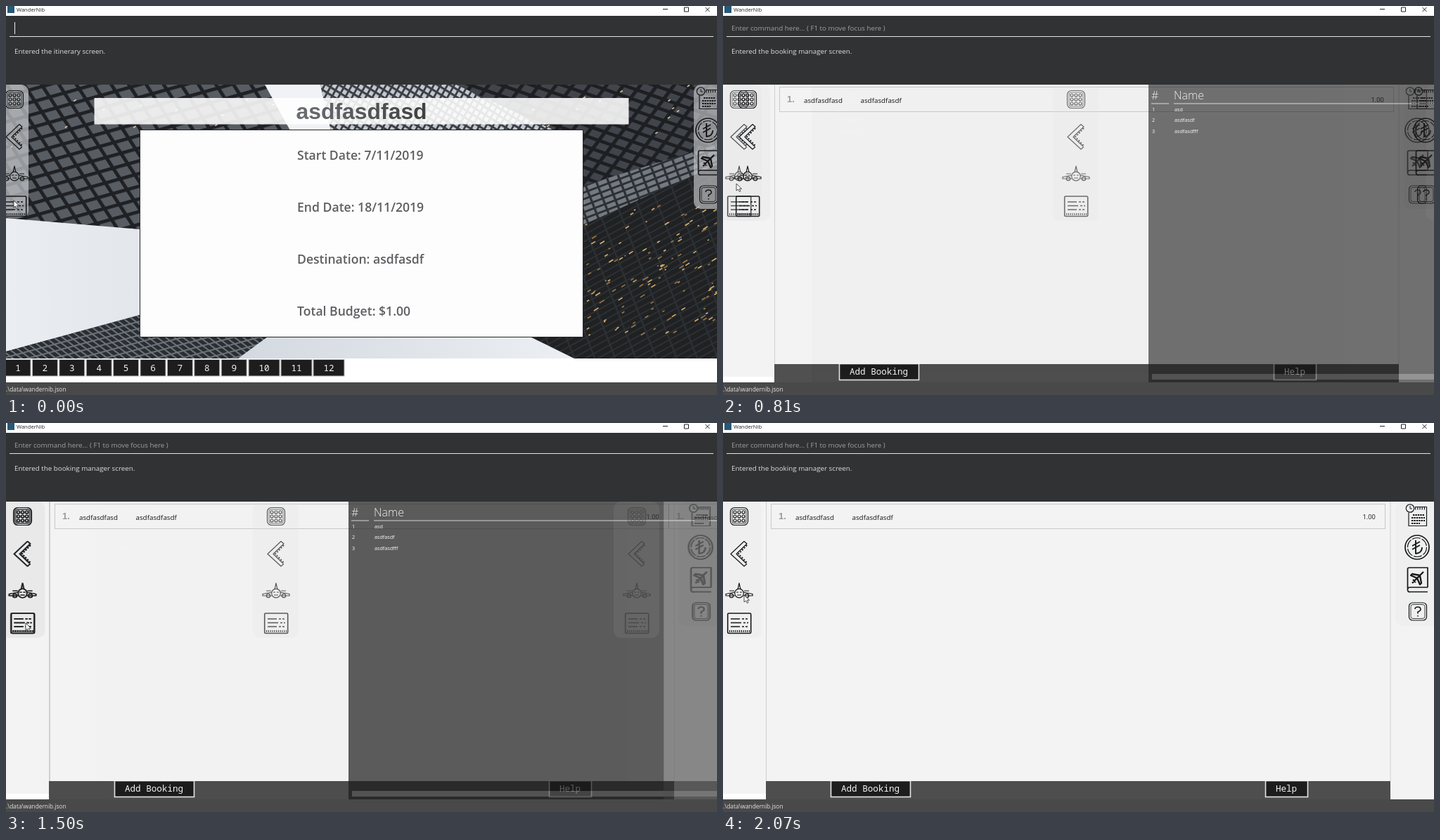
Recreate the animation shown at these times as an HTML page. Size 1011x554 px, loop 2300 ms.

```html
<!DOCTYPE html>
<html lang="en">
<head>
<meta charset="utf-8">
<title>WanderNib</title>
<style>
html, body { margin: 0; width: 100%; height: 100%; overflow: hidden; background: #fff; }
svg { display: block; width: 100%; height: 100%; }
text { font-family: "Open Sans", "Noto Sans", sans-serif; white-space: pre; }
.mono { font-family: "Noto Sans Mono", "DejaVu Sans Mono", monospace; }
.arial { font-family: "Liberation Sans", Arial, sans-serif; font-weight: 700; }
.light { font-weight: 300; }
.semi { font-weight: 600; }
.icon { fill: none; stroke: #17181a; stroke-width: 1.2; stroke-linejoin: round; }
</style>
</head>
<body>
<svg id="stage" viewBox="0 0 1011 554" preserveAspectRatio="none"></svg>
<script>
const LOOP = 2300, STEP = 30, WIDTH = 1011, SLIDE = 384;
const stage = document.getElementById('stage');

const rect = (x, y, w, h, fill, extra = '') =>
  `<rect x="${x}" y="${y}" width="${w}" height="${h}" fill="${fill}" ${extra}/>`;
const poly = (points, fill) => `<polygon points="${points}" fill="${fill}"/>`;
const path = (d, extra = '') => `<path d="${d}" ${extra}/>`;
const circle = (x, y, r, extra = '') => `<circle cx="${x}" cy="${y}" r="${r}" ${extra}/>`;
const text = (x, y, size, fill, str, cls = '', extra = '') =>
  `<text x="${x}" y="${y}" font-size="${size}" fill="${fill}" class="${cls}" ${extra}>${str}</text>`;
const range = n => [...Array(n).keys()];

function randomFrom(seed) {
  return () => (seed = (seed * 16807) % 2147483647) / 2147483647;
}

// Side bars
function leftIcons() {
  const dots = range(9).map(i => circle(17 + i % 3 * 6, 127 + Math.floor(i / 3) * 6, 2)).join('');
  return `<g class="icon">
    ${rect(10.5, 120.5, 25, 25, 'none', 'rx="6"')}${rect(13, 123, 20, 20, 'none', 'rx="3" stroke-width=".8"')}${dots}
    ${path('M30 168.5L11 186.5L30 204L34 200.5M30 168.5L34 172L19 186.5L33 200')}
    ${path('M34 174L22 186.5L34 199', 'stroke-width="2" stroke-dasharray="2 2"')}
    ${path('M21 237L23 228L25 237M17 241L4 243.5V246L17 246M29 241L42 243.5V246L29 246')}
    ${circle(23, 242.5, 6.3)}${circle(12, 246, 2.7)}${circle(34, 246, 2.7)}
    ${path('M19 241H22M24 241H27M20 245H26M9 239H16M30 239H37', 'stroke-width="1"')}
    ${rect(6.7, 271, 33, 28.5, 'none', 'rx="1.5" stroke-width="1.6"')}
    ${path('M11 279H24M11 284.5H26M11 290H24', 'stroke-width="1.6"')}
    ${path('M27 279H36M29 284.5H36M27 290H36', 'stroke-width="1.6" stroke-dasharray="3 2"')}
    ${path('M9 296.5H38', 'stroke-width="3" stroke-dasharray="1.2 1.6"')}
  </g>`;
}

function rightIcons() {
  return `<g class="icon">
    ${circle(977, 121.5, 5.7)}${path('M977 118V122H980', 'stroke-width="1"')}
    ${path('M975 128V146.5H1000.5V119.5H984')}
    ${path('M984 121.5H999', 'stroke-width="4" stroke-dasharray="1.2 2"')}
    ${path('M981 131H998M979 135H998M979 139H998M979 143H991', 'stroke-width="2.2" stroke-dasharray="2.4 1"')}
    ${circle(987, 177, 17, 'stroke-width="1.7"')}${circle(987, 177, 13.5, 'stroke-dasharray="12 2"')}
    ${path('M985 167V186Q994 185 994 177M980 175L991 169M980 180L991 174', 'stroke-width="1.9"')}
    ${path('M1002 234H977Q973.5 234 973.5 237.5T977 240.5H1002M973.5 237V208Q973.5 206 976 206H1002V234', 'stroke-width="1.7"')}
    ${path('M980 228L996 212M991 217L980 215L978 217L987 221M991 217L993 228L991 230L987 221M981 223L985 227', 'stroke-width="2.3"')}
    ${rect(975.5, 256, 25, 25, 'none', 'rx="5"')}${rect(978, 258.5, 20, 20, 'none', 'rx="3" stroke-width=".8"')}
    ${path('M984 265Q984 262 988 262T992 265.5Q992 267.5 988 269V271.5M988 274V275.5', 'stroke-width="1.6"')}
  </g>`;
}

const sideBars = () =>
  rect(-10, 112, 65, 194, '#e3e3e3', 'rx="10" opacity=".29"') +
  rect(956, 112, 65, 177, '#e3e3e3', 'rx="10" opacity=".29"') + leftIcons() + rightIcons();

// Pages
function skyline() {
  const random = randomFrom(77);
  const lamp = (x, y, w, tone) => rect(x.toFixed(1), y.toFixed(1), w.toFixed(1), 1.6, tone,
    `transform="rotate(-32 ${x.toFixed(1)} ${y.toFixed(1)})"`);
  const lamps = range(130).map(() => lamp(822 + random() * 189, 285 + random() * 185,
    2 + random() * 6, random() > .5 ? '#d9b26b' : '#9b7b4a')).join('');
  const highLamps = range(40).map(() => lamp(random() * WIDTH, 113 + random() * 90, 4, '#d8c8a8')).join('');
  return rect(0, 112, WIDTH, 390, '#25272b') +
    poly('0,112 372,112 430,177 190,320 0,302', 'url(#leftTower)') +
    poly('640,112 1011,112 1011,200 820,262 780,177', 'url(#rightTower)') +
    poly('820,262 1011,195 1011,502 760,502 745,471 820,440', 'url(#shade)') +
    highLamps + lamps +
    poly('368,112 447,112 462,177 404,177', '#f0f2f5') +
    poly('447,112 640,112 780,177 462,177', 'url(#mesh)') +
    poly('820,256 1011,197 1011,226 820,312', 'url(#steel)') +
    poly('0,302 190,318 190,440 0,492', 'url(#sky)') +
    poly('0,492 190,440 376,471 400,502 0,502', 'url(#ribs)') +
    poly('330,502 372,471 745,471 808,502', 'url(#haze)');
}

function itineraryPage() {
  const facts = ['Start Date: 7/11/2019', 'End Date: 18/11/2019', 'Destination: asdfasdf', 'Total Budget: $1.00'];
  const days = range(12).map(i => {
    const x = i < 9 ? -1 + i * 38.4 : 345 + (i - 9) * 46, w = i < 9 ? 36 : 44;
    return rect(x, 503.5, w, 23.5, '#1d1d1d', 'stroke="#b4b4b4"') +
      text(x + w / 2, 520, 12.7, '#f4f4f4', i + 1, 'mono', 'text-anchor="middle"');
  }).join('');
  return skyline() +
    rect(-12, 112, 44, 189, '#c4c6c9', 'rx="10" opacity=".72"') +
    rect(978, 112, 50, 177, '#c4c6c9', 'rx="10" opacity=".68"') +
    `<g transform="translate(-11)">${leftIcons()}</g><g transform="translate(11)">${rightIcons()}</g>` +
    rect(125.5, 131, 760, 37.5, '#fff', 'opacity=".88"') +
    text(412.5, 160.5, 31.9, 'url(#ink)', 'asdfasdfasd', 'arial') +
    rect(190.5, 176.5, 630, 295, '#fdfdfd', 'stroke="#25272a"') +
    facts.map((fact, i) => text(414, 219 + i * 74, 17.6, '#5e5f62', fact, 'semi')).join('') +
    rect(0, 502, WIDTH, 34, '#fff') + days;
}

function inventoryPage() {
  const rows = ['asd', 'asdfasdf', 'asdfasdfff'];
  return rect(126, 112, 759, 424, '#1c1c1c') +
    text(130, 133, 16, '#f2f2f2', '#', 'light') + text(162, 133, 16, '#f2f2f2', 'Name', 'light') +
    text(853, 133, 15, '#f2f2f2', '✓') +
    rect(130, 138.5, 25, 1, '#c8c8c8') + rect(162, 138.5, 684, 1, '#c8c8c8') +
    rows.map((row, i) => text(131, 149.7 + i * 15.4, 7.2, '#fff', i + 1) +
      text(163, 149.7 + i * 15.4, 7.2, '#fff', row)).join('') +
    rect(131, 524, 749, 8, '#565656') + sideBars();
}

function bookingPage() {
  const button = (x, w, label) => rect(x + .5, 509.5, w, 23, '#1d1d1d', 'stroke="#e6e6e6" stroke-width="1.6"') +
    rect(x - 1, 508, w + 3, 2, '#f3f3f3') +
    text(x + w / 2, 525, 12.6, '#f4f4f4', label, 'mono', 'text-anchor="middle"');
  return rect(61, 112, 888, 398, '#f3f3f3') + rect(61, 112, 1, 398, '#cfcfcf') + rect(948.5, 112, 1, 398, '#d2d2d2') +
    rect(68.5, 115.5, 873, 35, 'none', 'stroke="#c9c9c9"') +
    text(79, 136.5, 13, '#9a9a9a', '1.', 'arial') +
    text(103, 137.5, 9.8, '#161616', 'asdfasdfasd') + text(183.5, 138, 9.8, '#161616', 'asdfasdfasdf') +
    text(909.5, 136.5, 9.2, '#161616', '1.00') +
    rect(61, 510, 888, 26, '#4e4e4e') +
    button(153, 113, 'Add Booking') + button(771, 60, 'Help') + sideBars();
}

// Window panes in a leaning grid: the matrix holds the row and the column direction
const panes = (id, w, h, frame, glass, gap, matrix) =>
  `<pattern id="${id}" width="${w}" height="${h}" patternUnits="userSpaceOnUse" patternTransform="matrix(${matrix} 0 0)">
    ${rect(0, 0, w, h, frame)}${rect(gap, gap, w - gap, h - gap, glass)}</pattern>`;
const gradient = (id, from, to) =>
  `<linearGradient id="${id}"><stop stop-color="${from}"/><stop offset="1" stop-color="${to}"/></linearGradient>`;

const slides = [
  ['inventory', 340], ['booking', 450], ['inventory', 610], ['booking', 803], ['inventory', 960],
  ['booking', 1123], ['inventory', 1264], ['booking', 1420], ['inventory', 1565], ['booking', 1712, 358]
].map(([page, start, span = SLIDE]) => ({ page, start, span }));

const messages = {
  itinerary: 'Entered the itinerary screen.',
  inventory: 'entering the inventory page IS A SUCCESS',
  booking: 'Entered the booking manager screen.'
};

stage.innerHTML = `<defs>
  ${panes('leftTower', 21, 18, '#1f2124', '#585d64', 5, '1 -.28 .55 .85')}
  ${panes('rightTower', 19, 15, '#1d1f22', '#41454b', 5, '1 .35 -.6 .8')}
  ${panes('shade', 24, 9, '#2d3034', '#1f2123', 2, '1 -.55 .35 .9')}
  ${panes('ribs', 9, 12, '#6d747c', '#2a2d31', 2.5, '1 -.27 .8 .6')}
  ${panes('mesh', 9, 9, '#3b3f45', '#c3c8cf', 3, '.8 .5 -.5 .9')}
  ${panes('steel', 15, 9, '#2c2f33', '#747a82', 3, '1 -.38 .35 .9')}
  ${gradient('sky', '#eaedf1', '#e3e7ec')}${gradient('haze', '#d3d9e0', '#eceff3')}${gradient('ink', '#6b6f74', '#3f413f')}
  <clipPath id="view">${rect(0, 112, WIDTH, 424, '#fff')}</clipPath>
  <g id="itinerary">${itineraryPage()}</g><g id="inventory">${inventoryPage()}</g><g id="booking">${bookingPage()}</g>
</defs>
${rect(0, 0, WIDTH, 554, '#f3f3f3')}${rect(0, 528, 130, 8, '#fff')}
<g clip-path="url(#view)"><use id="first" href="#itinerary"/>
  ${slides.map(s => `<use class="slide" href="#${s.page}"/>`).join('')}</g>
${rect(0, 0, WIDTH, 14, '#fff')}${rect(2, 0, 10, 10, '#285878')}
${text(15, 8, 7.6, '#222', 'WanderNib')}
${path('M934 4.5H941M964.5 2H970.5V8H964.5ZM994.5 2L1000.5 8M1000.5 2L994.5 8', 'fill="none" stroke="#222"')}
${rect(0, 14, WIDTH, 98, '#313233')}${rect(5, 43, 1001, 1, '#e4e4e4')}
${rect(12, 23, 1, 17, '#eee', 'id="caret"')}
${text(12, 35, 9.8, '#a0a0a0', 'Enter command here... ( F1 to move focus here )', '', 'id="prompt"')}
${text(12, 68, 9.8, '#dedede', '', '', 'id="message"')}
${rect(0, 536, WIDTH, 18, '#49494a')}${text(0, 549, 8.3, '#e4e4e4', '.\\data\\wandernib.json')}
${circle(0, 0, 8, 'id="click" fill="#f2e600" opacity=".75"')}
${path('M0 0V10L2.5 8L4.3 11.5L6 10.7L4.3 7.3H7.5Z', 'id="pointer" fill="#fff" stroke="#222" stroke-width=".8"')}`;

const find = id => document.getElementById(id);
const [first, caret, hint, message, click, pointer] =
  ['first', 'caret', 'prompt', 'message', 'click', 'pointer'].map(find);
const slideNodes = [...document.querySelectorAll('.slide')];
const show = (node, visible) => { node.style.display = visible ? '' : 'none'; };

// time, x, y of the mouse pointer
const route = [
  [0, 11, 277], [200, 11, 277], [340, 13, 280], [420, 15, 244], [450, 15, 244], [610, 17, 284],
  [750, 18, 246], [810, 19, 253], [960, 22, 283], [1090, 24, 242], [1123, 25, 242], [1264, 26, 284],
  [1400, 27, 245], [1430, 27, 245], [1500, 28, 285], [1565, 28, 285], [1690, 29, 244], [2070, 30, 245]
];

function pointerAt(t) {
  const next = route.findIndex(key => key[0] > t);
  if (next < 0) return route[route.length - 1].slice(1);
  const [a, b] = [route[next - 1], route[next]], k = (t - a[0]) / (b[0] - a[0]);
  return [a[1] + (b[1] - a[1]) * k, a[2] + (b[2] - a[2]) * k];
}

// Short acceleration, constant speed, short braking
function easeBoth(k) {
  if (k >= 1) return 1;
  if (k < .2) return 3.125 * k * k;
  if (k <= .8) return 1.25 * k - .125;
  return 1 - 3.125 * (1 - k) ** 2;
}

function draw(time) {
  const t = time < 200 ? 0 : time < 240 ? 200 : Math.min(2070, Math.floor(time / STEP) * STEP);
  const started = slides.filter(s => s.start <= t).length;
  const settled = t >= 2070;
  slides.forEach((slide, i) => {
    const node = slideNodes[i], visible = i < started && i >= started - (settled ? 1 : 5);
    show(node, visible);
    if (!visible) return;
    const p = easeBoth((t - slide.start) / slide.span);
    node.setAttribute('transform', `translate(${Math.round((1 - p) * WIDTH)})`);
    node.setAttribute('opacity', .17 + .83 * p);
  });
  show(first, t < slides[0].start + SLIDE);
  show(caret, !started);
  show(hint, started);
  message.textContent = messages[started ? slides[started - 1].page : 'itinerary'];

  const [x, y] = pointerAt(t);
  pointer.setAttribute('transform', `translate(${x} ${y})`);
  click.setAttribute('transform', `translate(${x} ${y})`);
  show(click, slides.some(s => t >= s.start - 12 && t < s.start + 5));
}

const origin = performance.now();
function tick() {
  draw((performance.now() - origin) % LOOP);
  requestAnimationFrame(tick);
}
tick();
</script>
</body>
</html>
```
